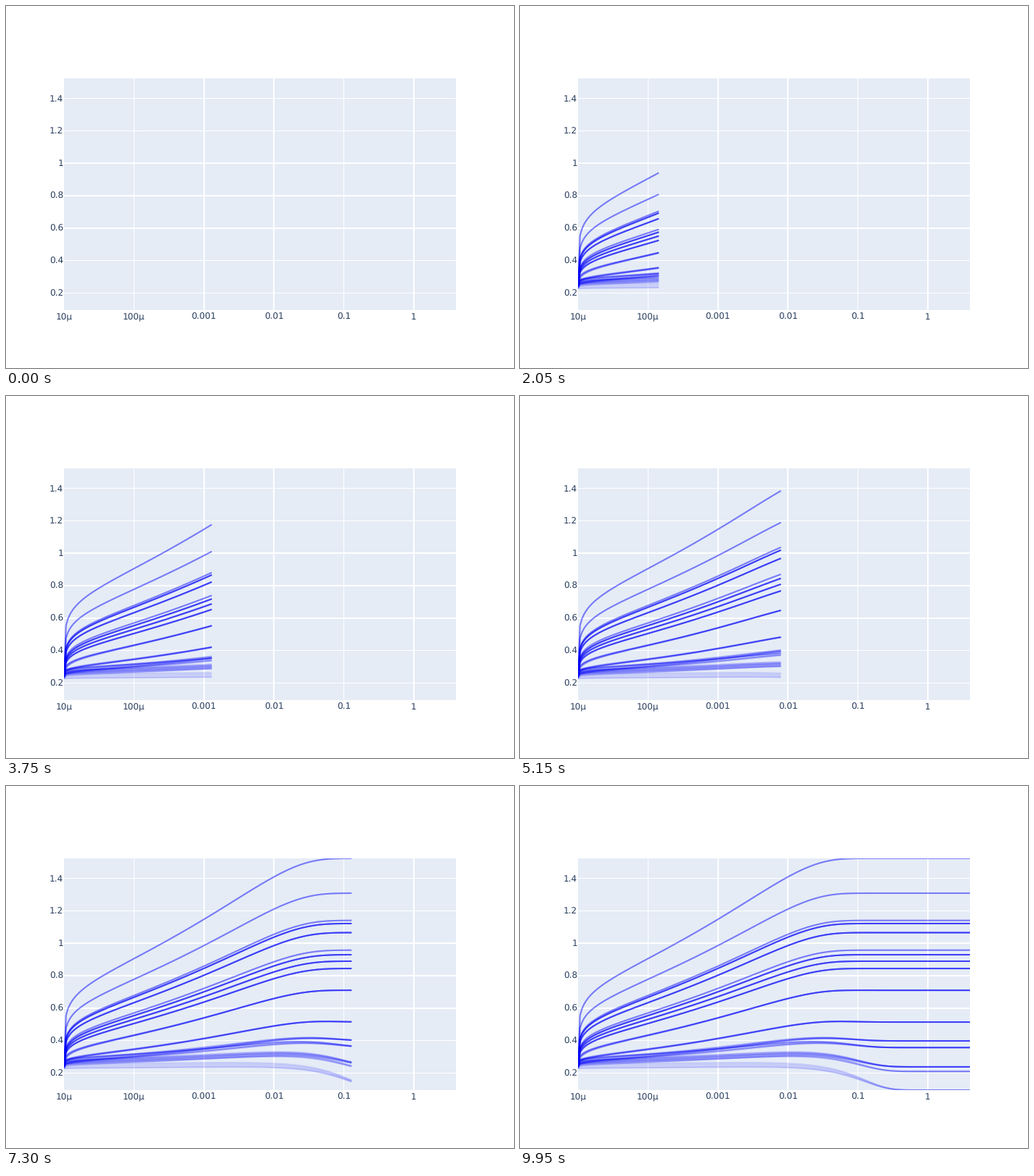
Animation, 700 px wide and 500 px high, one loop 10 s. Source, as a matplotlib script:

```python
import numpy as np
import matplotlib.pyplot as plt
from matplotlib.animation import FuncAnimation
from matplotlib.collections import LineCollection
from matplotlib.patches import Rectangle

W, H, DPI = 700, 500, 100
LEFT, TOP, PLOT_W, PLOT_H = 80, 100, 540, 320
FRAMES, INTERVAL = 200, 50
T_MIN, T_MAX = 1e-5, 4
INK, PANEL = "#2a3f5f", "#e5ecf6"

plt.rcParams.update({"font.family": "DejaVu Sans", "text.hinting": "none"})
fig = plt.figure(figsize=(W / DPI, H / DPI), dpi=DPI, facecolor="white")
ax = fig.add_axes([0, 0, 1, 1])
ax.set_xlim(0, W)
ax.set_ylim(H, 0)
ax.axis("off")


def to_x(t):
    return LEFT + PLOT_W * np.log(t / T_MIN) / np.log(T_MAX / T_MIN)


def to_y(value):
    return 217.1 + (1 - value) * 224.2


def box(x, y, w, h, color):
    patch = Rectangle((x, y), w, h, facecolor=color, edgecolor="none", lw=0)
    return ax.add_patch(patch)


def grid_span(p):
    """Start and thickness of a grid line in whole pixels."""
    near = round(p)
    return (near - 1, 2) if abs(p - near) < 0.25 else (int(p), 1)


def label(x, y, text, align):
    ax.text(x, y, text, ha=align, va="baseline", color=INK, fontsize=12 * 72 / DPI)


panel = box(LEFT, TOP, PLOT_W, PLOT_H, PANEL)

for i, name in enumerate(["10µ", "100µ", "0.001", "0.01", "0.1", "1"]):
    px = to_x(T_MIN * 10 ** i)
    if i:
        start, size = grid_span(px)
        box(start, TOP, size, PLOT_H, "white")
    label(px, 433, name, "center")

for value in np.arange(2, 15, 2) / 10:
    py = to_y(value)
    start, size = grid_span(py)
    box(LEFT, start, PLOT_W, size, "white")
    label(79, py + 4.2, f"{value:g}", "right")

# Plateau levels; doubled ones carry twice as many strands
SINGLE = [1.5226, 1.308, 1.14, 0.957, 0.21, 0.095]
DOUBLE = [1.121, 1.065, 0.929, 0.889, 0.844, 0.71, 0.514, 0.398, 0.357, 0.238]
STRANDS = 5

times = np.geomspace(T_MIN, T_MAX, FRAMES)
xs = to_x(times)
elapsed = times - T_MIN
growth = (1 - np.exp(-elapsed / 0.0163)) ** 0.1
decay = np.exp(-(elapsed / 0.175) ** 1.1)


def curve(level, start):
    """Growth towards a level blended with a fading start value."""
    q = max(2, 1 + 4.5 * level)
    return ((level * growth) ** q + (start * decay) ** q) ** (1 / q)


rng = np.random.default_rng(4)
paths = [np.column_stack([xs, to_y(curve(level, start))])
         for level in SINGLE + DOUBLE * 2
         for start in rng.normal(0.247, 0.01, STRANDS)]

lines = LineCollection([], colors=[(0, 0, 1, 0.12)], linewidths=2 * 72 / DPI,
                       capstyle="butt", joinstyle="round", zorder=3)
ax.add_collection(lines, autolim=False)
lines.set_clip_path(panel)


def draw(i):
    lines.set_segments([p[:i + 1] for p in paths] if i else [])
    return [lines]


anim = FuncAnimation(fig, draw, frames=FRAMES, interval=INTERVAL,
                     init_func=lambda: draw(0), repeat=True, repeat_delay=0)
plt.show()
```
